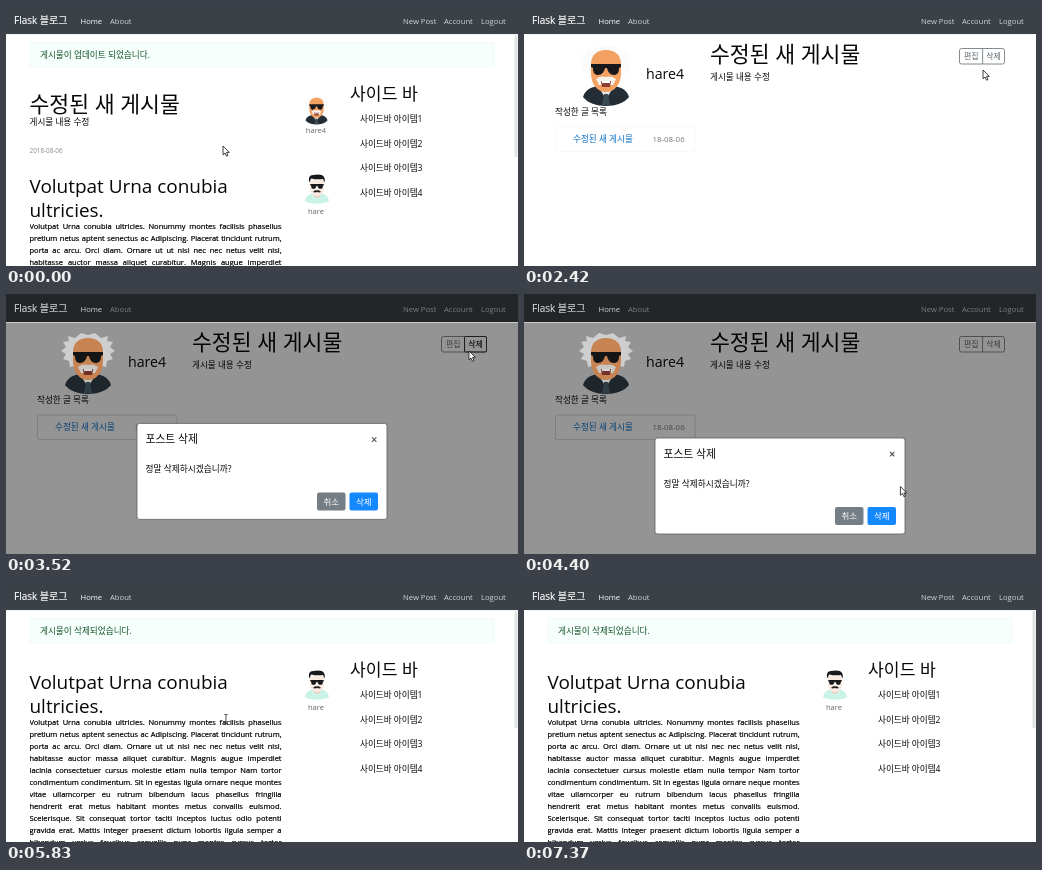
Animation of 512x260 px, one loop 7.48 s. Source, as an HTML page:

```html
<!DOCTYPE html>
<html lang="ko">
<head>
<meta charset="utf-8">
<title>Flask 블로그</title>
<style>
html, body { margin: 0; width: 100%; height: 100%; overflow: hidden; background: #fff; }
svg { display: block; width: 512px; height: 260px; }
svg, .para { font-family: "Open Sans", "Noto Sans CJK KR", "Noto Sans CJK", sans-serif; }
.small, .para { -webkit-text-stroke: .22px currentColor; }
.small { fill: currentColor; }
.para { font-size: 7.5px; line-height: 12px; color: #000; }
.para div { height: 12px; white-space: nowrap; text-align: justify; text-align-last: justify; }
</style>
</head>
<body>
<svg id="stage" viewBox="0 0 512 260"></svg>
<script>
const LOOP = 7480, STEP = 110;
const INK = "#060708", HOVER = "#0620a8";
const OPEN_DETAIL = 1870, OPEN_MODAL = 3300, DELETED = 5500;
const lorem = [
  "Volutpat Urna conubia ultricies. Nonummy montes facilisis phasellus",
  "pretium netus aptent senectus ac Adipiscing. Placerat tincidunt rutrum,",
  "porta ac arcu. Orci diam. Ornare ut ut nisi nec nec netus velit nisl,",
  "habitasse auctor massa aliquet curabitur. Magnis augue imperdiet",
  "lacinia consectetuer cursus molestie etiam nulla tempor Nam tortor",
  "condimentum condimentum. Sit in egestas ligula ornare neque montes",
  "vitae ullamcorper eu rutrum bibendum lacus phasellus fringilla",
  "hendrerit erat metus habitant montes metus convallis euismod.",
  "Scelerisque. Sit consequat tortor taciti inceptos luctus odio potenti",
  "gravida erat. Mattis integer praesent dictum lobortis ligula semper a",
  "bibendum varius faucibus convallis nunc montes cursus tortor"
];

// Small text gets a hairline stroke so it reads as dark as hinted type.
const text = (x, y, size, str, color = INK, extra = "") => size < 10
  ? `<text class="small" x="${x}" y="${y}" font-size="${size}" color="${color}" ${extra}>${str}</text>`
  : `<text x="${x}" y="${y}" font-size="${size}" fill="${color}" ${extra}>${str}</text>`;
const rect = (x, y, w, h, fill, extra = "") =>
  `<rect x="${x}" y="${y}" width="${w}" height="${h}" fill="${fill}" ${extra}/>`;
const group = (id, body, extra = "") => `<g id="${id}" ${extra}>${body}</g>`;
const middle = 'text-anchor="middle"';

const glasses = `<path d="M-15-18h30v3l-2 1c0 5-2 7-5 7-4 0-6-3-7-7h-2c-1 4-3 7-7 7-3 0-5-2-5-7l-2-1z" fill="#17191c"/>`;

function elder(x, y, scale) {
  return `<g transform="translate(${x} ${y}) scale(${scale})">
    <path d="M-13-32l-7-2 1 5-6 1 3 5-5 4 5 3-3 5 6 2 1 6 8-2h20l8 2 1-6 6-2-3-5 5-3-5-4 3-5-6-1 1-5-7 2-6-5-7 2-7-2z" fill="#fbfbfb"/>
    <path d="M-23 15C-21 8-15 5-8 4H8c7 1 13 4 15 11C14 27-14 27-23 15z" fill="#242d34"/>
    <path d="M-7 6L0 17 7 6z" fill="#e6e8e8"/>
    <path d="M-2 12h4l2 11h-8z" fill="#3b4a53"/>
    <path d="M-15-18c0-9 6-14 15-14s15 5 15 14v9C15 3 8 10 0 10S-15 3-15-9z" fill="#f3a063"/>
    <path d="M-10-3C-6-6-3-6 0-5c3-1 6-1 10 2l-3 6H-7z" fill="#f6f2ee"/>
    <path d="M-5-1H5L4 5H-4z" fill="#8f3b31"/><path d="M-4-1h8v2h-8z" fill="#fff"/>
    ${glasses}</g>`;
}

function youth(x, y) {
  return `<g transform="translate(${x} ${y}) scale(.5)">
    <path d="M-24 23C-22 12-15 9-8 8H8c7 1 14 4 16 15C15 30-15 30-24 23z" fill="#c8f3e6"/>
    <path d="M-7 7H7v6c-4 5-10 5-14 0z" fill="#ecd5c5"/>
    <path d="M-14-20h28V-3C14 7 7 13 0 13S-14 7-14-3z" fill="#f9ebe1"/>
    <path d="M-15-14c-3-9 0-15 7-15 8-2 20-2 22 4 2 3 2 7 1 11l-3-7c-7 1-17 1-24-1z" fill="#17191c"/>
    <g transform="translate(0 5) scale(.9)">${glasses}</g>
    <path d="M-8 5C-5 1-2 1 0 2c2-1 5-1 8 3-3 1-5 1-8 0-3 1-5 1-8 0z" fill="#24211f"/></g>`;
}

function loremPost(y) {
  return text(23.5, y, 18.95, "Volutpat Urna conubia") + text(23.5, y + 24, 18.95, "ultricies.") +
    `<foreignObject x="23.5" y="${y + 27}" width="252" height="140"><div class="para">${
      lorem.map(line => `<div>${line}</div>`).join("")}</div></foreignObject>` +
    youth(311, y - 3.5) + text(310, y + 20.5, 7.6, "hare", "#5f656a", middle);
}

function home(message, thumbEnd) {
  const items = [1, 2, 3, 4].map(n => text(354, 92 + n * 24.4, 8.6, "사이드바 아이템" + n)).join("");
  return rect(508.5, 28, 3, thumbEnd - 28, "#e2e3e3") +
    rect(24, 36.5, 464, 24.5, "#f6fffb", 'stroke="#e8f9f1" stroke-width=".7" rx="2"') +
    text(34, 52, 8.65, message, "#14532a", 'font-weight="500"') +
    text(344, 93.5, 17.2, "사이드 바") + items;
}

const newPost =
  group("title", text(23.5, 106, 21.6, "수정된 새 게시물", "currentColor")) +
  group("underline", rect(24, 107, 150, 1, HOVER)) +
  text(23.5, 119, 8.6, "게시물 내용 수정") + text(23.5, 147, 6.35, "2018-08-06", "#858a8f") +
  elder(310.5, 107, .48) + text(310, 127, 7.6, "hare4", "#5f656a", middle);

const detail =
  text(122, 73, 14.2, "hare4") + text(31, 109, 8.6, "작성한 글 목록") +
  group("listBorder", `<rect x="31.5" y="121" width="139.5" height="24.5" rx="1.5" fill="none" stroke="#d4d4d4" stroke-width=".9"/>`) +
  text(49, 136, 8.6, "수정된 새 게시물", "#0a6fc6") + text(128.5, 136, 7.9, "18-08-06", "#72777c") +
  text(186, 56, 21.6, "수정된 새 게시물") + text(186, 73.5, 8.6, "게시물 내용 수정") +
  rect(435.5, 42.5, 45, 15.5, "none", 'rx="2" stroke="#777e84" stroke-width=".9"') +
  rect(458.2, 42.5, .9, 15.5, "#777e84") +
  text(447.2, 53.2, 7.9, "편집", "#5f676d", middle) + text(469.6, 53.2, 7.9, "삭제", "#5f676d", middle) +
  group("focus", rect(458.5, 42.5, 22, 15.5, "none", 'rx="1" stroke="#30353a" stroke-width="1"') +
    text(469.6, 53.2, 7.9, "삭제", "#30353a", middle));

const modal =
  rect(131, 144, 250, 96, "#fff", 'rx="2.5" stroke="#5e5e5e" stroke-width=".8"') +
  text(139.5, 164, 10.8, "포스트 삭제") +
  `<path d="M366 158l4.4 4.4m0-4.4l-4.4 4.4" stroke="#555" stroke-width="1.1"/>` +
  text(139.5, 193, 8.7, "정말 삭제하시겠습니까?") +
  rect(311, 213, 28.5, 18, "#757e85", 'rx="2"') + text(325.2, 225.2, 8.5, "취소", "#fff", middle) +
  `<rect id="confirm" x="343.5" y="213" width="28.5" height="18" rx="2"/>` +
  text(357.8, 225.2, 8.5, "삭제", "#fff", middle);

const outline = 'fill="#fff" stroke="#111" stroke-width=".8" stroke-linejoin="round"';
const cursors =
  group("arrow", `<path d="M0 0v8.8l2-1.8 1.5 3.2 1.5-.7-1.5-3.1h2.8z" ${outline}/>`) +
  group("hand", `<path d="M-1.5-6.5c0-1.4 2-1.4 2 0v4l1-.3 1.2.5 1.3.2 1.4.8.6 1.2-.4 3.6-1.2 3.5h-5.4l-3-4.6c-.9-1.6.6-2.4 1.6-1.2l.9 1z" ${outline}/>`) +
  group("beam", `<path d="M-1.7-4.5h1.4l.3.3.3-.3h1.4M0-4.2v8.6M-1.7 4.7h1.4l.3-.3.3.3h1.4" fill="none" stroke="#222" stroke-width=".8"/>`);

const stage = document.getElementById("stage");
stage.innerHTML =
  rect(0, 0, 512, 260, "#fff") +
  group("updatedPage", home("게시물이 업데이트 되었습니다.", 151) + newPost + loremPost(187)) +
  group("detailPage", detail) +
  group("deletedPage", home("게시물이 삭제되었습니다.", 146) + loremPost(107)) +
  rect(0, 0, 512, 28, "#3a4147") +
  [[104, "About"], [397, "New Post"], [438, "Account"], [475, "Logout"]]
    .map(([x, label]) => text(x, 18, 7.65, label, "#d3d6d8")).join("") +
  `<rect id="backdrop" width="512" height="260"/>` +
  group("bright", rect(0, 28, 512, 1, "#f4f8f8") +
    text(8, 18, 10, "Flask 블로그", "#fff", 'stroke="#fff" stroke-width=".15"') +
    text(74.5, 18, 7.65, "Home", "#fff", 'font-weight="500"') + group("portrait", elder(82, 76, 1))) +
  group("modal", modal) + group("cursor", cursors);

const el = {};
stage.querySelectorAll("[id]").forEach(node => el[node.id] = node);
const show = (node, on) => node.setAttribute("display", on ? "inline" : "none");
const clamp = v => Math.min(1, Math.max(0, v));

// time, x, y
const path = [
  [0, 217, 140], [440, 217, 140], [990, 138, 104], [1870, 138, 104],
  [2420, 459, 64], [2860, 463, 57], [3850, 463, 57], [4620, 355, 226],
  [5500, 355, 226], [5830, 220, 137], [6160, 220, 137], [6710, 214, 275]
];

function pointer(t) {
  const i = path.findIndex(p => p[0] > t);
  if (i < 0) return path[path.length - 1].slice(1);
  const [a, b] = [path[i - 1], path[i]];
  const p = (t - a[0]) / (b[0] - a[0]), s = p * p * (3 - 2 * p);
  return [a[1] + (b[1] - a[1]) * s, a[2] + (b[2] - a[2]) * s];
}

function draw(t) {
  const [x, y] = pointer(t);
  const onDetail = t >= OPEN_DETAIL && t < DELETED;
  const modalOpen = t >= OPEN_MODAL && t < DELETED;
  show(el.updatedPage, t < OPEN_DETAIL);
  show(el.detailPage, onDetail);
  show(el.portrait, onDetail);
  show(el.deletedPage, t >= DELETED);

  const overTitle = t < OPEN_DETAIL && x < 174 && y < 110;
  el.title.style.color = overTitle ? HOVER : INK;
  show(el.underline, overTitle);

  const dim = modalOpen ? clamp((t - OPEN_MODAL) / 150) : 0;
  const p = modalOpen ? clamp((t - OPEN_MODAL - 140) / 300) : 0;
  el.backdrop.setAttribute("opacity", .42 * dim);
  el.bright.style.filter = dim ? `brightness(${1 - .18 * dim})` : "none";
  el.listBorder.setAttribute("opacity", .15 + .85 * dim);
  show(el.focus, onDetail && t >= 2860 && t < 3960);
  el.modal.setAttribute("opacity", clamp(p * 4));
  el.modal.setAttribute("transform", `translate(0 ${-24 * (1 - p) ** 1.6})`);

  const overConfirm = modalOpen && x < 372 && y > 213;
  el.confirm.setAttribute("fill", overConfirm ? "#0a78f0" : "#1488ff");

  const kind = overTitle || overConfirm ? "hand" : t >= 5720 ? "beam" : "arrow";
  for (const name of ["arrow", "hand", "beam"]) show(el[name], name === kind);
  el.cursor.setAttribute("transform", `translate(${x} ${y})`);
}

const start = performance.now();
function tick() {
  const t = (performance.now() - start) % LOOP;
  draw(Math.floor(t / STEP) * STEP);
  requestAnimationFrame(tick);
}
draw(0);
requestAnimationFrame(tick);
</script>
</body>
</html>
```
